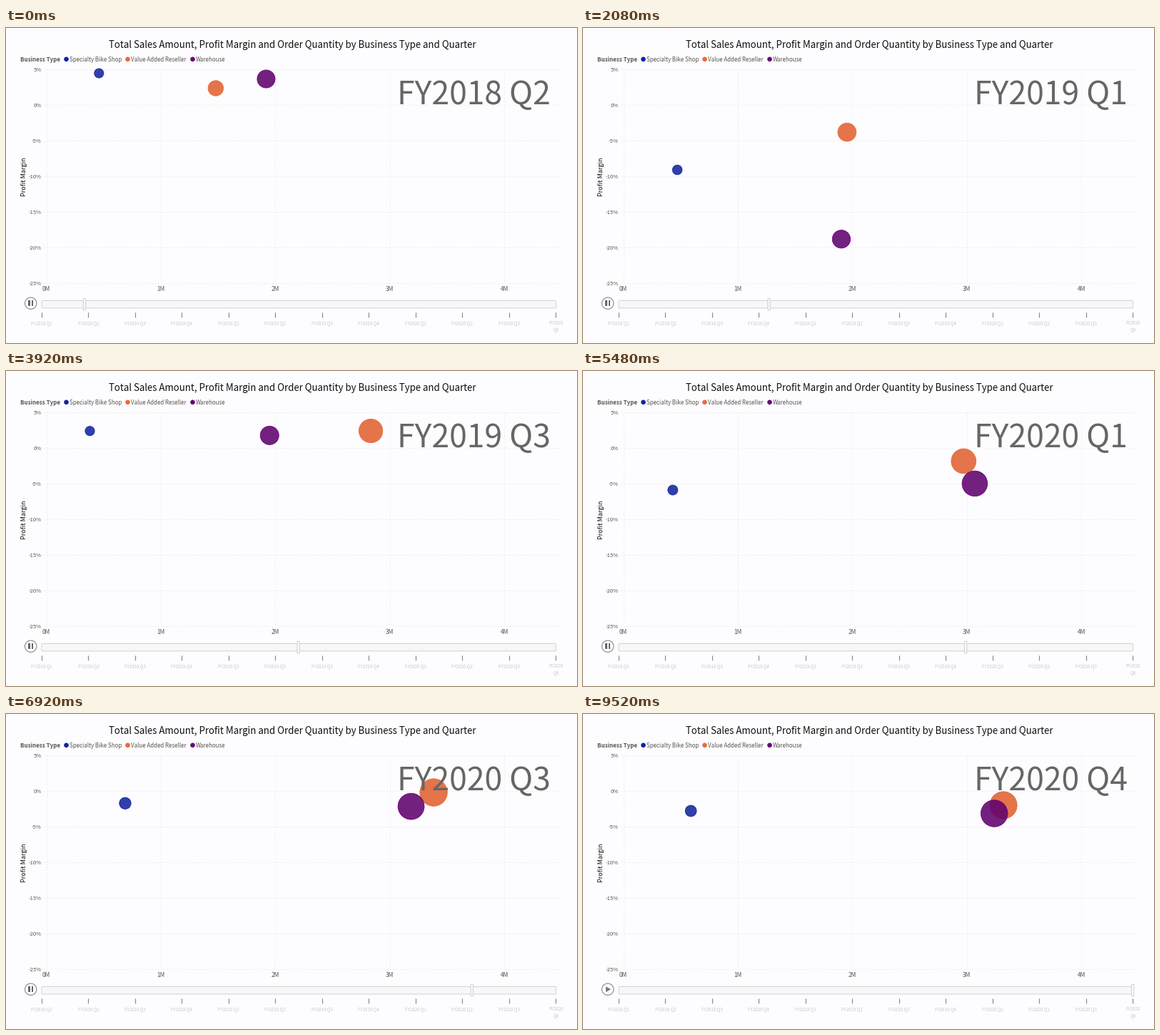
A matplotlib script that plays this animation: 800x442 px, repeating every 10 s.

```python
import numpy as np
import matplotlib.pyplot as plt
from matplotlib.animation import FuncAnimation
from matplotlib.patches import Circle, FancyBboxPatch, Polygon, Rectangle

W, H, DPI = 800, 442, 100
FRAMES, INTERVAL = 250, 40
STOP_MS = 8480

BACKGROUND = "#fdfcfe"
DARK, GRAY, CALLOUT, FAINT = "#111111", "#5a5856", "#666666", "#c9c8ca"

QUARTERS = [f"FY{year} Q{q}" for year in (2018, 2019, 2020) for q in (1, 2, 3, 4)]
LAST = len(QUARTERS) - 1
TRACK_LEFT, TRACK_RIGHT = 49.5, 769.7
STEP = (TRACK_RIGHT - TRACK_LEFT) / LAST

# Playback: a slow first step, then an even pace to the end.
CLOCK_MS, CLOCK_QUARTER = (0, 1097, 8369), (0.917, 2, LAST)

# Sales (millions) and margin (%) turn at a few quarters;
# margins also dip at the last quarter of FY2018 and of FY2019.
SALES_TURNS = (1, 2, 3, 6, 7, 9, 11)
MARGIN_TURNS = (1, 6, 9, 11)
DIP_QUARTERS = (3, 7)
SERIES = [
    dict(name="Specialty Bike Shop", color="#12239e", fill="#12239e", legend_x=84,
         sales=(0.46, 0.55, 0.48, 0.36, 0.36, 0.70, 0.59),
         margin=(4.5, 2.2, -1.55, -2.75), dips=(16, 10.9)),
    dict(name="Value Added Reseller", color="#e66c37", fill="#e2602f", legend_x=170,
         sales=(1.48, 1.81, 1.87, 3.03, 2.86, 3.39, 3.32),
         margin=(2.4, 2.45, 0.05, -1.95), dips=(7.9, 5.4)),
    dict(name="Warehouse", color="#6b007b", fill="#5e006c", legend_x=261,
         sales=(1.92, 1.37, 1.90, 1.96, 3.04, 3.18, 3.24),
         margin=(3.7, 1.6, -2.0, -3.1), dips=(27.5, 8.4)),
]

plt.rcParams["font.family"] = "Noto Sans CJK JP"
fig = plt.figure(figsize=(W / DPI, H / DPI), dpi=DPI, facecolor=BACKGROUND)
ax = fig.add_axes((0, 0, 1, 1))
# Whole coordinates fall on pixel centres.
ax.set(xlim=(-0.5, W - 0.5), ylim=(H - 0.5, -0.5))
ax.axis("off")


def pt(px):
    return px * 72 / DPI


def sales_x(millions):
    return 56 + 160.4 * millions


def margin_y(percent):
    return 108 - 10 * percent


def label(x, y, text, size, color=GRAY, ha="left", **kwargs):
    kwargs.setdefault("va", "baseline")
    return ax.text(x, y, text, fontsize=pt(size), color=color, ha=ha, **kwargs)


def grid_line(xs, ys):
    ax.plot(xs, ys, color="#dfdee1", lw=pt(1), dashes=(1, 3), zorder=1)


def draw_chart():
    label(401, 28, "Total Sales Amount, Profit Margin and Order Quantity "
          "by Business Type and Quarter", 13.25, DARK, "center")
    label(19.5, 46.5, "Business Type", 8, GRAY, weight="bold")
    for series in SERIES:
        x = series["legend_x"]
        ax.add_patch(Circle((x, 43.3), 3.3, fc=series["color"], lw=0))
        label(x + 4.4, 46.5, series["name"], 8)

    for percent in range(5, -26, -5):
        y = margin_y(percent)
        grid_line((52, 778), (y, y))
        label(49, y + 2.8, f"{percent}%", 7.6, ha="right")
    for millions in range(5):
        x = sales_x(millions)
        grid_line((x, x), (58, 358))
        label(x, 368.6, f"{millions}M", 8.2, ha="center")
    label(25, 208, "Profit Margin", 9, DARK, "center", va="center", rotation=90)


def draw_timeline():
    ax.add_patch(FancyBboxPatch(
        (TRACK_LEFT, 382), TRACK_RIGHT - TRACK_LEFT + 0.5, 10.5,
        boxstyle="round,pad=0,rounding_size=1.5",
        fc="#f8f7f8", ec="#d3d2d4", lw=pt(1)))
    for i, quarter in enumerate(QUARTERS):
        x = TRACK_LEFT + i * STEP
        ax.plot((x, x), (399, 405.5), color="#8a898b", lw=pt(1.2),
                solid_capstyle="butt")
        lines = quarter.split() if i == LAST else [quarter]
        for row, text in enumerate(lines):
            label(x, 415.8 + 9 * row, text, 6.2, FAINT, "center")
    ax.add_patch(Circle((34.2, 385.8), 8.2, fc="none", ec="#7d7c7e", lw=pt(1)))


draw_chart()
draw_timeline()

bubbles = []
for order, series in enumerate(SERIES):
    bubble = Circle((0, 0), 1, fc=(series["fill"], 0.87), ec=series["color"],
                    lw=pt(0.8), zorder=3 + order)
    bubbles.append(ax.add_patch(bubble))

callout = label(547.2, 107, "", 44.6, CALLOUT, weight=350, zorder=8)
handle = ax.add_patch(FancyBboxPatch(
    (0, 379), 3.4, 16.5, boxstyle="round,pad=0,rounding_size=1",
    fc="#fbfafb", ec="#cfced0", lw=pt(1), zorder=6))
pause_bars = [ax.add_patch(Rectangle((x, 381.8), 2.2, 8, fc="#666666", lw=0))
              for x in (30.9, 35.2)]
play_mark = ax.add_patch(Polygon([(31.5, 381.8), (31.5, 389.8), (38.5, 385.8)],
                                 fc="#777678", lw=0))


def bubble_state(series, quarter):
    sales = np.interp(quarter, SALES_TURNS, series["sales"])
    margin = np.interp(quarter, MARGIN_TURNS, series["margin"])
    for dip_quarter, depth in zip(DIP_QUARTERS, series["dips"]):
        margin -= depth * max(0, 1 - abs(quarter - dip_quarter))
    radius = 4.6 + 4.1 * sales + 0.08 * quarter
    return (sales_x(sales), margin_y(margin)), radius


def update(frame):
    ms = frame * INTERVAL
    quarter = np.interp(ms, CLOCK_MS, CLOCK_QUARTER)
    for bubble, series in zip(bubbles, SERIES):
        bubble.center, bubble.radius = bubble_state(series, quarter)
    callout.set_text(QUARTERS[int(np.ceil(quarter))])
    handle.set_x(TRACK_LEFT + quarter * STEP - 1.7)
    stopped = ms >= STOP_MS
    play_mark.set_visible(stopped)
    for bar in pause_bars:
        bar.set_visible(not stopped)
    return []


animation = FuncAnimation(fig, update, frames=FRAMES, interval=INTERVAL,
                          repeat=True, cache_frame_data=False)
plt.show()
```
